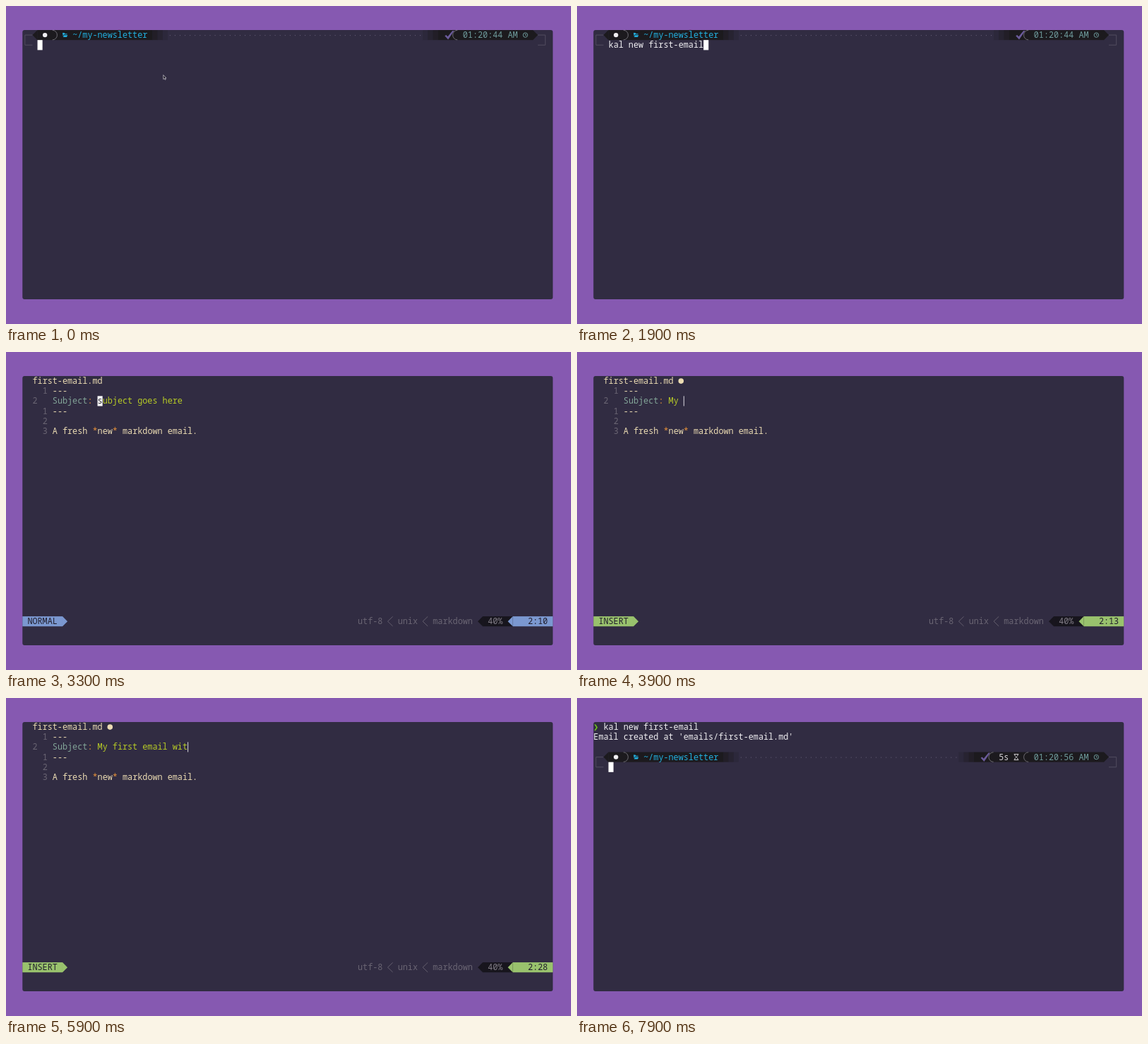
Animation, 800 px wide and 450 px high, one loop 8 s. Source, as an HTML page:

```html
<!DOCTYPE html>
<html lang="en">
<head>
<meta charset="utf-8">
<title>Terminal session</title>
<style>
  html, body { margin: 0; width: 100%; height: 100%; overflow: hidden; background: #8659b1; }
  svg { display: block; width: 800px; height: 450px; }
  text { font: 11.81px "Noto Sans Mono", "DejaVu Sans Mono", monospace; white-space: pre; }
</style>
</head>
<body>
<svg viewBox="0 0 800 450">
  <rect width="800" height="450" fill="#8659b1"/>
  <rect x="23.3" y="34" width="751" height="381" rx="3" fill="#312c42"/>
  <g id="screen"></g>
</svg>
<script>
const LOOP = 8000, STEP = 100;
const CW = 7.085, RH = 14.17, LEFT = 23.3, TOP = 34;
const SUBJECT = 'My first email with Kal!';
const C = {
  white: '#f0eff2', cream: '#ebdbb2', dim: '#6a6573', dark: '#1c1a1e', black: '#17151d',
  cyan: '#22b0df', teal: '#83a598', green: '#b8cc26', orange: '#e8923a', clock: '#6f9b9c',
  line: '#514c5f', check: '#6b5b9b', sep: '#77747c', ink: '#211e2c'
};
const MODE = { NORMAL: '#7b98d0', INSERT: '#99c26d', COMMAND: '#e3c185' };

const screen = document.getElementById('screen');
const X = col => LEFT + col * CW;
const Y = row => TOP + row * RH;

const rect = (col, row, cols, fill, alpha = 1) =>
  `<rect x="${X(col)}" y="${Y(row)}" width="${cols * CW}" height="${RH}" fill="${fill}" opacity="${alpha}"/>`;
const path = (d, stroke, width = 1, fill = 'none') =>
  `<path d="${d}" stroke="${stroke}" stroke-width="${width}" fill="${fill}"/>`;
const dot = (x, y, r, fill) => `<circle cx="${x}" cy="${y}" r="${r}" fill="${fill}"/>`;
const text = (col, row, str, fill) =>
  `<text x="${X(col)}" y="${Y(row) + 11.1}" fill="${fill}">${str}</text>`;
const block = (col, row, ch = '') =>
  rect(col, row, 1, '#fff') + (ch.trim() ? text(col, row, ch, C.ink) : '');

// Solid powerline arrow in one cell; dir 1 points right, -1 left.
function arrow(col, row, dir, fill) {
  const flat = X(dir > 0 ? col : col + 1), y = Y(row);
  return path(`M${flat} ${y}l${dir * CW} ${RH / 2}l${-dir * CW} ${RH / 2}z`, 'none', 0, fill);
}
// Thin rounded divider; dir 1 is ")", -1 is "(".
function divider(col, row, dir) {
  const x = X(dir > 0 ? col : col + 1) - (dir < 0 ? 0.5 : 0), y = Y(row) + 0.3;
  return path(`M${x} ${y}a6.6 6.8 0 0 ${dir > 0 ? 1 : 0} 0 13.6`, C.sep, 0.9);
}
const shade = (col, row, levels) =>
  levels.map((a, i) => rect(col + i, row, 1, C.dark, a)).join('');

function frameCorners(row) {
  const y1 = Y(row) + RH / 2, y2 = y1 + RH;
  const side = (edge, mid) => path(`M${edge} ${y1}H${mid}V${y2}H${edge}`, C.line);
  return side(X(2), X(0.5)) + side(X(103), X(104.5));
}

function folder(x, y) {
  return path(`M${x - 3.5} ${y - 3}h2.6l1 1.1h2.9v1.1h-4.4l-1.3 2.8z`, 'none', 0, C.cyan) +
    path(`M${x - 1.2} ${y + 0.1}h5l-1.4 2.9h-5.2z`, 'none', 0, C.cyan);
}
function checkMark(x, y) {
  return path(`M${x - 6.5} ${y + 1.2}l2-1.4l2.2 2.4l6.8-8.4l2.4 .2l-8.6 12.4z`, 'none', 0, C.check);
}
function hourglass(x, y) {
  return path(`M${x - 3.3} ${y - 4}h6.6M${x - 3.3} ${y + 4}h6.6M${x - 2.3} ${y - 4}c0 3 2 3 2 4s-2 1-2 4` +
    `M${x + 2.3} ${y - 4}c0 3-2 3-2 4s2 1 2 4`, '#d4d2d6', 1);
}

function prompt(row, time, spent) {
  const y = Y(row) + RH / 2, first = spent ? 73 : 80;
  let out = frameCorners(row);
  out += arrow(2, row, -1, C.dark) + rect(3, row, 23, C.dark) + shade(26, row, [0.72, 0.46, 0.2]);
  out += dot(X(4.5), y, 3.2, C.white) + divider(6, row, 1) + folder(X(8.5), y);
  out += text(10, row, '~/my-newsletter', C.cyan);
  for (let col = 29; col < first; col++) out += dot(X(col + 0.5), y + 0.5, 0.62, '#69617b');
  out += shade(first, row, [0.2, 0.46, 0.72]) + rect(first + 3, row, 99 - first, C.dark);
  out += checkMark(X(first + 5) + 2.2, y) + divider(first + 6, row, -1);
  if (spent) out += text(81, row, spent, '#d4d2d6') + hourglass(X(84.5), y) + divider(86, row, -1);
  out += text(88, row, time, C.clock);
  out += `<circle cx="${X(100.5)}" cy="${y}" r="3.2" fill="none" stroke="${C.clock}"/>`;
  out += path(`M${X(100.5)} ${y - 1.8}v2h1.6`, C.clock, 0.9);
  return out + arrow(102, row, 1, C.dark);
}

function pointer() {
  return path('M222.8 97.6v6l1.4-1.2l1 2l1-.5l-.9-1.9h1.7z', '#d8d5df', 0.7, '#1b1922');
}

// [start, typed, suggestion]
const KEYS = [
  [0, '', ''], [300, 'k', 'al send first-email'], [400, 'ka', 'l send first-email'],
  [600, 'kal', ' send first-email'], [800, 'kal ', 'send first-email'],
  [1100, 'kal n', 'ew first-email'], [1300, 'kal ne', 'w first-email'],
  [1400, 'kal new', ' first-email'], [1700, 'kal new first-email', '']
];

function typing(t) {
  const [, typed, hint] = KEYS.filter(k => k[0] <= t).pop();
  const col = 3 + typed.length;
  return prompt(0, '01:20:44 AM') + text(3, 1, typed, C.white) + block(col, 1, hint[0]) +
    text(col + 1, 1, hint.slice(1), C.dim) + (t < 300 ? pointer() : '');
}

function output() {
  return text(0, 0, '❯', '#73c71c') + text(2, 0, 'kal new first-email', C.white) +
    text(0, 1, "Email created at 'emails/first-email.md'", C.white);
}

function subjectLength(t) {
  const n = t < 3900 ? (t - 3500) / 130 : t < 4900 ? 3 + (t - 3900) / 140 : 10 + (t - 4900) / 112;
  return Math.max(0, Math.min(SUBJECT.length, Math.floor(n)));
}

function statusBar(mode, line, col) {
  const color = MODE[mode], width = mode.length + 2, y = Y(24);
  const chevron = c => path(`M${X(c + 1)} ${y + 0.3}L${X(c)} ${y + RH / 2}L${X(c + 1)} ${y + RH - 0.3}`, C.dim, 0.9);
  return rect(0, 24, width, color) + arrow(width, 24, 1, color) + text(1, 24, mode, C.ink) +
    text(67, 24, 'utf-8', C.dim) + chevron(73) + text(75, 24, 'unix', C.dim) + chevron(80) +
    text(82, 24, 'markdown', C.dim) +
    arrow(91, 24, -1, C.black) + rect(92, 24, 6, C.black) +
    text(93, 24, line === 1 ? 'Top' : '40%', '#817d86') +
    arrow(97, 24, -1, color) + rect(98, 24, 8, color) + text(101, 24, `${line}:${col}`, C.ink);
}

function editor(t) {
  const line = t < 3000 ? 1 : 2;
  const edited = t >= 3400;
  const mode = t >= 6900 ? 'COMMAND' : edited && t < 6700 ? 'INSERT' : 'NORMAL';
  const subject = edited ? SUBJECT.slice(0, subjectLength(t)) : 'subject goes here';
  const col = t < 3200 ? 1 : !edited ? 10 : mode === 'INSERT' ? 10 + subject.length : 33;
  const rows = ['---', 'Subject: ' + subject, '---', '', 'A fresh *new* markdown email.'];

  let out = text(2, 0, 'first-email.md', C.cream);
  if (edited) out += dot(X(17.5), Y(0) + RH / 2, 3.8, C.cream);
  rows.forEach((row, i) => {
    const gap = Math.abs(i + 1 - line);
    out += text(gap ? 4 : 2, i + 1, gap || line, C.dim);
  });
  out += text(6, 1, rows[0], C.cream) + text(6, 3, rows[2], C.cream);
  out += text(6, 2, 'Subject', C.teal) + text(13, 2, ':', C.orange) + text(15, 2, subject, C.green);
  out += text(6, 5, 'A fresh ', C.cream) + text(14, 5, '*', C.orange) + text(15, 5, 'new', C.cream) +
    text(18, 5, '*', C.orange) + text(20, 5, 'markdown email.', C.cream);

  if (mode === 'NORMAL') out += block(5 + col, line, rows[line - 1][col - 1]);
  if (mode === 'INSERT') out += `<rect x="${X(5 + col)}" y="${Y(2)}" width="1" height="${RH}" fill="#d9d6de"/>`;
  if (mode === 'COMMAND') {
    const cmd = t < 7300 ? ':' : t < 7400 ? ':w' : ':wq';
    out += text(0, 25, cmd, C.cream) + block(cmd.length, 25);
  }
  return out + statusBar(mode, line, col);
}

function scene(t) {
  if (t < 2100) return typing(t);
  if (t < 2200) return output();
  if (t < 7600) return editor(t);
  if (t < 7700) return output() + block(0, 2);
  return output() + prompt(3, '01:20:56 AM', '5s') + block(3, 4);
}

let shown = -1;
function tick() {
  const t = Math.floor((performance.now() % LOOP) / STEP) * STEP;
  if (t !== shown) {
    shown = t;
    screen.innerHTML = scene(t);
  }
  requestAnimationFrame(tick);
}
tick();
</script>
</body>
</html>
```
